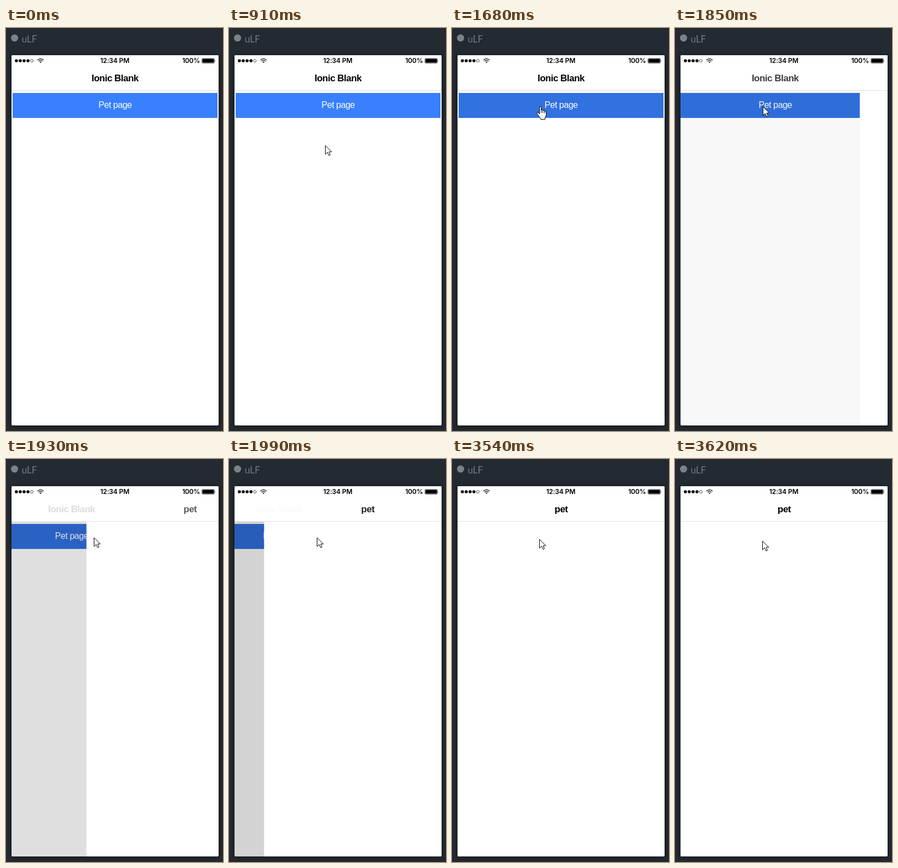
Write an HTML page that moves like this. It is 393 px wide and 726 px high and loops after 3.69 s.

```html
<!DOCTYPE html>
<html lang="en">
<head>
<meta charset="utf-8">
<title>Page transition</title>
<style>
  html, body { margin: 0; width: 100%; height: 100%; overflow: hidden; background: #242a32; }
  svg { display: block; }
  .phone { filter: drop-shadow(0 1px 4px rgba(0, 0, 0, .5)); }
  .label { font: 17px Lato, sans-serif; fill: #747a81; }
  .status { font: 600 12px Inter, sans-serif; letter-spacing: -.15px; }
  .title { font: bold 17px "Liberation Sans", Arial, sans-serif; letter-spacing: -.03em; text-anchor: middle; }
  .action { font: 16px "Liberation Sans", Arial, sans-serif; letter-spacing: -.03em; text-anchor: middle; fill: #fff; }
  .pointer { fill: #fff; stroke: #000; stroke-linejoin: round; }
</style>
</head>
<body>
<svg width="393" height="726" viewBox="0 0 393 726">
  <defs>
    <clipPath id="screen"><rect x="10" y="49" width="375" height="667" rx="2"/></clipPath>
  </defs>

  <circle cx="15.5" cy="18" r="6.5" fill="#7c8289"/>
  <text class="label" x="28.5" y="25.5">uLF</text>
  <rect class="phone" x="10" y="49" width="375" height="667" rx="2" fill="#fff"/>

  <g clip-path="url(#screen)">
    <rect x="10" y="113" width="375" height="603"/>
    <g id="homePage">
      <rect x="10" y="113" width="375" height="603" fill="#fff"/>
      <rect id="button" x="12" y="117" width="371" height="45"/>
      <text class="action" x="197.7" y="144">Pet page</text>
    </g>
    <rect id="petPage" x="10" y="113" width="375" height="603" fill="#fff"/>
    <path d="M10 49H385V113H10Z" fill="#fff"/>
    <path d="M10 112.5H385" stroke="#e2e2e2"/>
    <text id="homeTitle" class="title" x="197.5" y="96">Ionic Blank</text>
    <text id="petTitle" class="title" x="197.8" y="96">pet</text>
  </g>

  <g class="status">
    <circle cx="18.8" cy="59" r="2.8"/>
    <circle cx="25.8" cy="59" r="2.8"/>
    <circle cx="32.8" cy="59" r="2.8"/>
    <circle cx="39.8" cy="59" r="2.8"/>
    <circle cx="46.8" cy="59" r="2.5" fill="none" stroke="#000" stroke-width=".7"/>
    <g fill="none" stroke="#000" stroke-width="1.3">
      <path d="M57 57.7Q62.5 53 68 57.7M59 59.8Q62.5 56.8 66 59.8"/>
      <path d="M60.8 61.2Q62.5 59.8 64.2 61.2L62.5 63Z" fill="#000" stroke="none"/>
    </g>
    <text x="197" y="63.3" text-anchor="middle">12:34 PM</text>
    <text x="351.5" y="63.3" text-anchor="end">100%</text>
    <rect x="354.8" y="54.8" width="22.6" height="8.6" rx="1.6" fill="none" stroke="#000" stroke-width=".6"/>
    <rect x="355.6" y="55.6" width="21" height="7" rx="1"/>
    <path d="M378.2 57.6Q379.8 59 378.2 60.6Z"/>
  </g>

  <g id="cursor" class="pointer">
    <path id="arrow" stroke-linejoin="miter" d="M.5 .8V16.6L4.3 13L7 18.8L9.4 17.7L7 12.1H11.8Z"/>
    <g id="hand" transform="translate(-6)">
      <path d="M5.5 14V2Q5.5 .5 7 .5T8.5 2V7.5Q8.7 6 10 6T11.5 7.5V8.5Q11.8 7 13 7T14.5 8.5V10Q14.8 8.5 16 8.5T17.5 10V16Q17.5 18.5 15.5 20.5V23.5H7.5V21.5Q5 19.5 3.5 16.5L.9 13.2Q.4 11.4 2 11T4 12.2Z"/>
      <path fill="none" d="M8.5 7V12M11.5 8V12M14.5 9.5V12.5"/>
    </g>
  </g>
</svg>

<script>
const LOOP = 3690;
const TICKS = [0, 380, 460, 540, 610, 690, 770, 840, 910, 990, 1070, 1140, 1220, 1300, 1370,
  1450, 1530, 1680, 1770, 1850, 1930, 1990, 2070, 2140, 2220, 2300, 3540, 3620];
const ENTER = 380, PRESS = 1680, SLIDE_START = 1819, SLIDE_END = 2300;
const BUTTON_BOTTOM = 162;

// Pointer path: time, x, y
const PATH = [
  [380, 289, 692], [840, 176, 225], [910, 174, 211], [1300, 161, 149], [1370, 159, 141],
  [1450, 153, 129], [1530, 159, 141], [2300, 159, 141], [3540, 158, 144], [3620, 158, 147]
];

const el = id => document.getElementById(id);
const mix = (a, b, u) => a + (b - a) * u;
const cubic = (a, b, s) => 3 * (1 - s) ** 2 * s * a + 3 * (1 - s) * s * s * b + s ** 3;

// cubic-bezier(.36, .66, .04, 1)
function slideEase(u) {
  if (u <= 0 || u >= 1) return u <= 0 ? 0 : 1;
  let low = 0, high = 1;
  for (let i = 0; i < 24; i++) {
    const s = (low + high) / 2;
    if (cubic(.36, .04, s) < u) low = s; else high = s;
  }
  return cubic(.66, 1, low);
}

function pointerAt(t) {
  const next = PATH.findIndex(point => point[0] > t);
  if (next < 0) return PATH.at(-1).slice(1);
  const [t0, x0, y0] = PATH[next - 1], [t1, x1, y1] = PATH[next];
  let u = (t - t0) / (t1 - t0);
  if (next === 1) u = 1 - (1 - u) ** 2;
  return [Math.round(mix(x0, x1, u)), Math.round(mix(y0, y1, u))];
}

function shift(node, x, opacity) {
  node.setAttribute("transform", `translate(${x})`);
  node.setAttribute("opacity", opacity);
}

function show(node, visible) {
  node.setAttribute("visibility", visible ? "visible" : "hidden");
}

function draw(t) {
  const p = slideEase((t - SLIDE_START) / (SLIDE_END - SLIDE_START));
  const leaveX = -.33 * 375 * p, enterX = .995 * 375 * (1 - p);
  shift(el("homePage"), leaveX, 1 - .2 * p);
  shift(el("homeTitle"), leaveX, (1 - p) ** 2);
  shift(el("petPage"), enterX, p > 0 ? 1 : 0);
  shift(el("petTitle"), enterX, p);

  const present = t >= ENTER;
  const [x, y] = present ? pointerAt(t) : [0, 0];
  const hover = present && y < BUTTON_BOTTOM;
  const onHand = hover && t < SLIDE_START;
  el("cursor").setAttribute("transform", `translate(${x} ${y})`);
  show(el("arrow"), present && !onHand);
  show(el("hand"), onHand);
  el("button").setAttribute("fill", t >= PRESS ? "#3171e0" : hover ? "#5090ff" : "#3880ff");
}

const start = performance.now();
function frame() {
  const t = (performance.now() - start) % LOOP;
  draw(TICKS.findLast(tick => tick <= t));
  requestAnimationFrame(frame);
}
frame();
</script>
</body>
</html>
```
